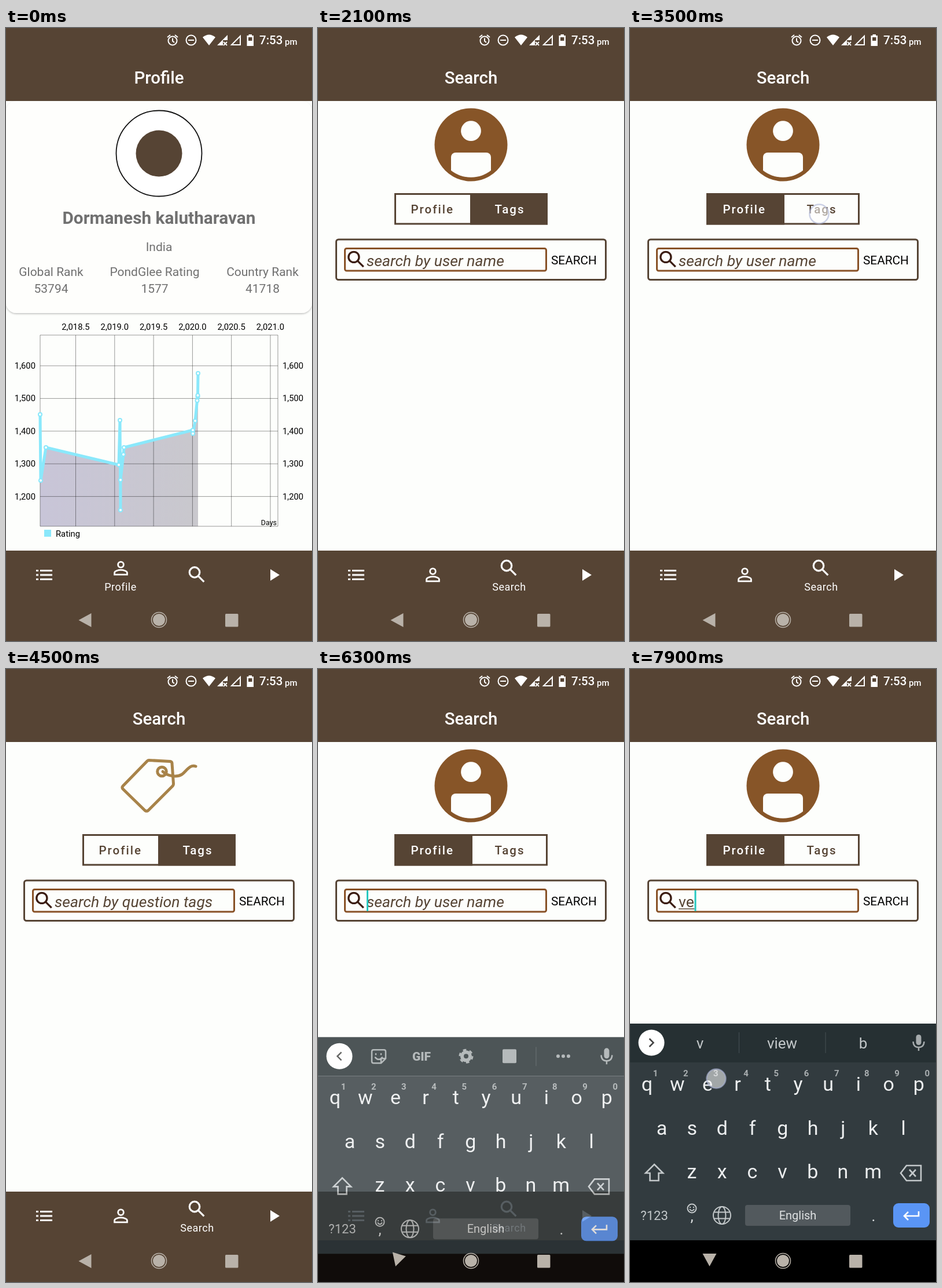
An HTML page for the animation above (8 s loop, 529 px wide and 1058 px high).

```html
<!DOCTYPE html>
<html lang="en">
<head>
<meta charset="utf-8">
<title>Profile and search</title>
<style>
html, body { margin: 0; width: 100%; height: 100%; overflow: hidden; background: #fdfefc; }
svg { display: block; width: 100vw; height: 100vh; font-family: Roboto, sans-serif; }
.mid { text-anchor: middle; }
.end { text-anchor: end; }
.line { fill: none; stroke: currentColor; }
.round { stroke-linecap: round; stroke-linejoin: round; }
.grey { fill: #707070; font-size: 21px; }
.axis { font-size: 14.8px; }
.label { fill: #fff; font-size: 18px; letter-spacing: .5px; text-anchor: middle; }
.seg { font-size: 20.5px; font-weight: 500; letter-spacing: 2px; }
.keys { fill: #eceeef; font-size: 34px; text-anchor: middle; }
.hint { fill: #a9aeb0; font-size: 15px; font-weight: 700; }
.word { fill: #c3c8ca; font-size: 26px; text-anchor: middle; }
</style>
</head>
<body>
<svg viewBox="0 0 529 1058">
  <defs>
    <g id="lens" class="line" stroke-width="2"><circle cx="-2.5" cy="-2.5" r="5.5"/><path d="M1.6 1.6 7.7 7.7"/></g>
    <linearGradient id="area"><stop stop-color="#c8c5d8"/><stop offset="1" stop-color="#c9c8cd"/></linearGradient>
    <filter id="shadow" x="-5%" width="110%" y="-5%" height="112%"><feDropShadow dx="0" dy="1.5" stdDeviation="1.5" flood-opacity=".25"/></filter>
    <clipPath id="disc"><circle cx="264.5" cy="201.5" r="56.3"/></clipPath>
  </defs>
  <rect width="529" height="1058" fill="#fdfefc"/>

  <g id="profile">
    <rect y="126" width="529" height="366" rx="18" fill="#fefefc" filter="url(#shadow)"/>
    <circle cx="264.5" cy="216.5" r="74" fill="#fff" stroke="#111" stroke-width="1.8"/>
    <circle cx="264.5" cy="216.5" r="40" fill="#564434"/>
    <text class="mid" x="264.5" y="338" font-size="29.8" font-weight="700" fill="#707070">Dormanesh kalutharavan</text>
    <g class="grey mid">
      <text x="264.5" y="384.5">India</text>
      <text x="78" y="428">Global Rank</text><text x="78" y="457">53794</text>
      <text x="257" y="428">PondGlee Rating</text><text x="257" y="457">1577</text>
      <text x="443.5" y="428">Country Rank</text><text x="443.5" y="457">41718</text>
    </g>
    <g id="chart">
      <path id="fill" fill="url(#area)"/>
      <path id="grid" class="line" color="#000" stroke-opacity=".4"/>
      <path id="curve" class="line" color="#8ae8fb" stroke-width="5" stroke-linejoin="round"/>
      <g id="dots" fill="#fff" stroke="#8ae8fb" stroke-width="2"></g>
      <g id="axes" class="axis"></g>
      <text class="end" x="468" y="858" font-size="12.5">Days</text>
      <rect x="66" y="866" width="12" height="12" fill="#8ae8fb"/>
      <text class="axis" x="86" y="878">Rating</text>
    </g>
  </g>

  <g id="search" color="#564434">
    <g id="avatar">
      <g id="outline" class="line" color="#565b5e" stroke-width="5.5">
        <circle cx="264.5" cy="201.5" r="60.2" pathLength="1"/>
        <ellipse cx="264.5" cy="178.5" rx="17" ry="21" pathLength="1"/>
        <path d="M227 248V222q0-10 10-10h55q10 0 10 10v26" pathLength="1"/>
      </g>
      <g id="solid">
        <circle id="plate" cx="264.5" cy="201.5" fill="#875528"/>
        <g id="figure" fill="#fdfefc">
          <circle cx="264.5" cy="177.7" r="17.4"/>
          <rect x="230" y="215" width="69" height="60" rx="8" clip-path="url(#disc)"/>
        </g>
      </g>
    </g>
    <g id="tag" class="line round" color="#a88349" stroke-width="5">
      <path d="M247 157.500 L284 159.500Q287 160 287 163L289.500 198Q289.500 201 287 203L246 244Q243 246.500 240 244L202 207Q200 204.500 202 202L244 159Q245.500 157.500 247 157.500Z" pathLength="1"/>
      <circle cx="269.500" cy="177" r="7.800" pathLength="1"/>
      <path d="M271 177C278 184 294 188 304 182C312 176 318 164 328 168" pathLength="1"/>
    </g>
    <rect x="133.500" y="286.500" width="262" height="51.500" fill="#fdfefc" stroke="#564434" stroke-width="3"/>
    <rect id="picked" y="285" height="54.500" fill="#564434"/>
    <text id="segProfile" class="seg" x="160.500" y="320">Profile</text>
    <text id="segTags" class="seg" x="305.500" y="320">Tags</text>
    <rect class="line" x="31.500" y="365" width="466" height="69.500" rx="4" stroke-width="3"/>
    <rect class="line" color="#885126" x="46.500" y="380.500" width="348" height="38.500" rx="3" stroke-width="3"/>
    <use href="#lens" color="#3b1d12" transform="translate(66 399.500) scale(1.65)"/>
    <text id="field" x="84" y="410.500" font-size="26.6" fill="#564434"></text>
    <path id="underline" class="line" stroke-width="1.500"/>
    <rect id="cursor" y="382" width="3" height="36" fill="#27c8c0"/>
    <text x="403" y="408" font-size="20.8">SEARCH</text>
  </g>

  <path d="M0 0H529V126H0ZM0 902H529V1058H0Z" fill="#564434"/>
  <text id="title" class="mid" x="264.500" y="96" font-size="29.5" font-weight="500" fill="#fff"></text>
  <g color="#fff" fill="#fff">
    <g class="line" stroke-width="2">
      <circle cx="288" cy="22" r="7.500"/><path d="M288 17.500V22.500L291 25M279 16 284 12M292 12 297 16"/>
      <circle cx="320" cy="21" r="8.500"/><path d="M315 21H325"/>
      <path d="M390 29H405V14ZM376 24 382 30M382 24 376 30"/>
    </g>
    <path d="M340 16Q351 7 362 16L351 30ZM365 30 383 12V21H375V30ZM419.500 11H425V13H428V31H416.500V13H419.500Z"/>
    <path d="M419 16H425.500V22H419Z" fill="#564434"/>
    <text x="438" y="28" font-size="20.5" font-weight="500">7:53</text>
    <text x="482" y="28.500" font-size="15" font-weight="500">pm</text>
    <path class="line" stroke-width="3" d="M52 936.500H56M59 936.500H80M52 944H56M59 944H80M52 951.500H56M59 951.500H80"/>
    <g id="navProfile"><g class="line" stroke-width="1.8" transform="translate(198.500 944) scale(1.56)">
      <circle cy="-4" r="3.100"/><path d="M-7 7V5C-7 3-3 1.900 0 1.900S7 3 7 5V7Z"/>
    </g></g>
    <g id="navSearch"><use href="#lens" transform="translate(330 943.500) scale(1.6)"/></g>
    <path d="M457 934 473 944 457 954Z"/>
    <text id="labelProfile" class="label" x="198" y="971">Profile</text>
    <text id="labelSearch" class="label" x="330.500" y="971">Search</text>
  </g>

  <rect id="dark" y="986" width="529" height="72"/>
  <g id="keyboard">
    <rect y="612" width="529" height="67" fill="#263033"/>
    <rect y="679" width="529" height="307" fill="#323b3f"/>
    <circle cx="37" cy="645" r="22.500" fill="#fff"/>
    <path id="chevron" class="line" color="#444" stroke-width="2.500" d="M-3.500 -7 3.500 0-3.500 7"/>
    <g id="tools" fill="#a6abad" color="#a6abad">
      <path class="line round" stroke-width="2.500" d="M96 634H114Q117 634 117 637V649L109 657H96Q93 657 93 654V637Q93 634 96 634ZM117 649H109V657M99 647Q105 654 111 647M100 641V642M109 641V642"/>
      <text class="mid" x="179" y="653" font-size="21" font-weight="900">GIF</text>
      <circle class="line" cx="256" cy="645" r="7" stroke-width="6"/>
      <circle class="line" cx="256" cy="645" r="11" stroke-width="3" stroke-dasharray="5.760"/>
      <rect x="319" y="633" width="24" height="24" rx="2"/>
      <path class="line" d="M377 629V662" opacity=".3"/>
      <circle cx="415" cy="645" r="3"/><circle cx="424" cy="645" r="3"/><circle cx="433" cy="645" r="3"/>
    </g>
    <g id="words" class="word">
      <text x="121" y="655">v</text><text x="263" y="655">view</text><text x="403" y="655">b</text>
      <path d="M188.500 627V663M338 627V663" stroke="#465054"/>
    </g>
    <g color="#a6abad"><rect x="494.500" y="631" width="9" height="18" rx="4.500" fill="currentColor"/>
      <path class="line" stroke-width="2.500" d="M489.500 643Q490 653 499 653T508.500 643M499 653V659"/></g>
    <g id="letters" class="keys"></g>
    <g class="line" color="#c3c8ca" stroke-width="2.600">
      <path d="M42 855 57 870H49.500V883H34.500V870H27Z"/>
      <path d="M478 857H503V883H478L468 870ZM483 864 494 876M494 864 483 876"/>
      <g stroke-width="2"><circle cx="107" cy="931" r="7.500"/><path d="M103 932Q107 938 111 932M104 928V930M110 928V930"/>
      <circle cx="159" cy="943" r="15"/><ellipse cx="159" cy="943" rx="6.500" ry="15"/><path d="M145.500 937.500H172.500M145.500 948.500H172.500"/></g>
    </g>
    <rect x="199" y="925" width="182" height="36" rx="4" fill="#52595d"/>
    <g fill="#dfe2e3" class="mid">
      <text x="42" y="951" font-size="22" fill="#c3c8ca">?123</text>
      <text x="107" y="953" font-size="26">,</text>
      <text x="290" y="950" font-size="20">English</text>
      <text x="421" y="953" font-size="26">.</text>
    </g>
    <rect x="455" y="922" width="63" height="42" rx="9" fill="#5a95f5"/>
    <path class="line" color="#fff" stroke-width="2.600" d="M499 936V944H474M481 937 474 944 481 951"/>
  </g>
  <g fill="#b9b2a9">
    <path id="back" d="M-12 0 10-12V12Z"/>
    <circle cx="264.500" cy="1021.500" r="10.500"/><circle class="line" color="#b9b2a9" cx="264.500" cy="1021.500" r="13" stroke-width="1.500"/>
    <rect x="379" y="1011" width="22.500" height="22.500" rx="1.500"/>
  </g>
  <circle id="touch" r="16.500" fill="#fff" fill-opacity=".55" stroke="#aab3d6" stroke-opacity=".6" stroke-width="2.500"/>
</svg>
<script>
const $ = id => document.getElementById(id);
const set = (id, attrs) => { for (const k in attrs) $(id).setAttribute(k, attrs[k]); };
const show = (id, alpha) => set(id, { opacity: +alpha, display: alpha > 0 ? 'inline' : 'none' });
const ramp = (t, from, to) => Math.min(1, Math.max(0, (t - from) / (to - from)));
const easeOut = p => 1 - (1 - p) ** 3;
const smooth = p => p * p * (3 - 2 * p);
const text = (x, y, s, cls) => `<text x="${x}" y="${y}" class="${cls}">${s}</text>`;

function buildChart() {
  const points = [[59, 667], [60, 781], [69, 724], [195, 754], [197, 677], [198, 832], [198, 780],
    [203, 736], [204, 724], [323, 694], [323, 700], [327, 678], [330.5, 643], [331.5, 636], [331.5, 634], [332, 596]];
  const path = 'M' + points.join('L');
  set('curve', { d: path });
  set('fill', { d: path + 'V860H59Z' });
  $('dots').innerHTML = points.map(([x, y]) => `<circle cx="${x}" cy="${y}" r="3"/>`).join('');
  let grid = 'M59 530H470V860H59Z', labels = '';
  for (let i = 0; i < 6; i++) {
    const x = 120.5 + 67.3 * i;
    grid += `M${x} 530V860`;
    labels += text(x, 520.5, '2,0' + (18.5 + i / 2).toFixed(1), 'mid');
  }
  for (let i = 0; i < 5; i++) {
    const y = 583 + 56.4 * i, label = `1,${6 - i}00`;
    grid += `M59 ${y}H470`;
    labels += text(51, y + 5, label, 'end') + text(478, y + 5, label, '');
  }
  set('grid', { d: grid });
  $('axes').innerHTML = labels;
}

function buildKeys() {
  const rows = [['qwertyuiop', 29.5, 728], ['asdfghjkl', 55, 804], ['zxcvbnm', 107, 879]];
  $('letters').innerHTML = rows.map(([keys, x, y], r) => [...keys].map((key, i) =>
    text(x + 52.2 * i, y, key, '') + (r ? '' : text(x + 14.5 + 52.2 * i, 703, (i + 1) % 10, 'hint'))
  ).join('')).join('');
}

// start, x, y
const taps = [[1000, 330, 955], [2400, 200, 318], [3500, 327, 321], [5200, 198, 317],
  [6100, 210, 402], [7200, 264, 870], [7900, 149, 707]];

function trace(id, progress) {
  [...$(id).children].forEach((el, i) => {
    const p = progress(i);
    el.style.strokeDasharray = p < 1 ? `${p} 2` : 'none';
    el.style.visibility = p > 0 ? 'visible' : 'hidden';
  });
}

function drawAvatar(age) {
  const fill = smooth(ramp(age, 240, 600));
  trace('outline', () => ramp(age, -60, 160));
  show('outline', 1 - fill);
  set('plate', { r: 63 * fill });
  show('figure', fill);
}

function drawSearch(t) {
  const enter = easeOut(ramp(t, 1200, 1600)), scale = 0.9 + 0.1 * enter;
  show('search', ramp(t, 1150, 1300));
  set('search', { transform: `translate(264.5 514) scale(${scale}) translate(-264.5 -514)` });

  const tagMode = t >= 3600 && t < 5300;
  const tagsPicked = t < 2500 || tagMode;
  show('avatar', !tagMode);
  show('tag', tagMode);
  drawAvatar(t - (t < 2500 ? 1200 : t < 5300 ? 2500 : 5300));
  trace('tag', i => smooth(ramp(t, 3650 + 200 * i, 4150 + 170 * i)));
  set('picked', tagsPicked ? { x: 263, width: 134 } : { x: 132, width: 135 });
  set('segProfile', { fill: tagsPicked ? '#564434' : '#fff' });
  set('segTags', { fill: tagsPicked ? '#fff' : '#564434' });

  const typed = t >= 7900 ? 've' : t >= 7300 ? 'v' : '';
  const end = 84 + [0, 13, 27.5][typed.length];
  $('field').textContent = typed || (tagMode ? 'search by question tags' : 'search by user name');
  set('field', { 'font-style': typed ? 'normal' : 'italic' });
  set('underline', { d: `M84 414H${end}` });
  set('cursor', { x: end });
  show('cursor', t >= 6200 && t < 6700 || t >= 7200 && t < 7600 || t >= 7900);
}

function drawNav(t) {
  const p = smooth(ramp(t, 1120, 1320));
  $('title').textContent = t < 1200 ? 'Profile' : 'Search';
  set('navProfile', { transform: `translate(0 ${-11.5 * (1 - p)})` });
  set('navSearch', { transform: `translate(0 ${-11.5 * p})` });
  show('labelProfile', 1 - ramp(p, 0, 0.5));
  show('labelSearch', ramp(p, 0.5, 1));
}

function drawKeyboard(t) {
  const up = easeOut(ramp(t, 6172, 6472)), words = ramp(t, 7300, 7450);
  show('dark', up);
  show('keyboard', up);
  set('keyboard', { transform: `translate(0 ${126 * (1 - up)})` });
  set('back', { transform: `translate(137.500 ${1022 - 3 * up}) rotate(${-90 * up})` });
  set('chevron', { transform: `translate(37 645) rotate(${180 * (1 - words)})` });
  show('tools', 1 - words);
  show('words', words);
}

function drawTouch(t) {
  const tap = taps.find(([start]) => t >= start && t < start + 180);
  show('touch', tap ? 1 - ramp(t, tap[0] + 110, tap[0] + 180) : 0);
  if (tap) set('touch', { cx: tap[1], cy: tap[2] });
}

function render(now) {
  const t = now % 8000;
  show('profile', 1 - ramp(t, 1100, 1200));
  drawSearch(t);
  drawNav(t);
  drawKeyboard(t);
  drawTouch(t);
  requestAnimationFrame(render);
}

buildChart();
buildKeys();
render(performance.now());
</script>
</body>
</html>
```
